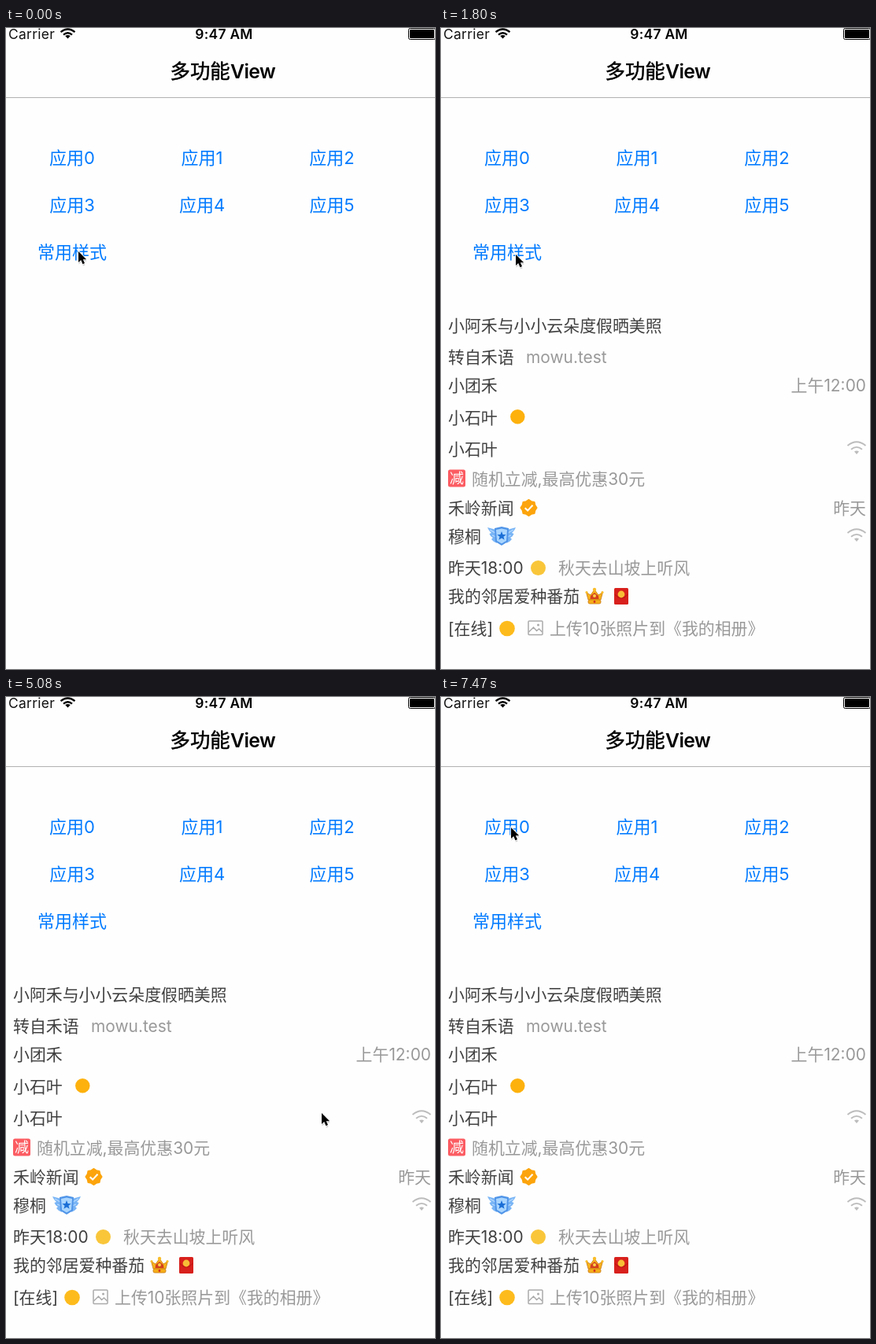
These frames come from a looping animation (545 by 815 pixels, 8 s). An HTML page:

```html
<!DOCTYPE html>
<html lang="zh-CN">
<head>
<meta charset="utf-8">
<title>多功能View</title>
<style>
html, body { margin: 0; width: 100%; height: 100%; overflow: hidden; background: #fefefe; }
svg { display: block; width: 100%; height: 100%; }
text { font-family: Inter, "Noto Sans CJK SC", "Noto Sans CJK", sans-serif; white-space: pre; }
</style>
</head>
<body>
<svg id="stage" viewBox="0 0 545 815">
  <rect width="545" height="815" fill="#fefefe"/>
  <path d="M0 88.5H545" stroke="#b2b2b2"/>
  <g id="bar"></g>
  <g id="buttons"></g>
  <g id="list"></g>
  <g id="cursor">
    <path d="M0 1V15L3.3 12L5.6 17.2L8.2 16L6 11H10.4Z" fill="#000" opacity=".18" transform="translate(.4 1.4)"/>
    <path d="M0 0V14L3.2 11L5.5 16.2L8 15L5.8 10.2H10.2Z" stroke="#fff" stroke-width="1.6" paint-order="stroke"/>
  </g>
</svg>
<script>
const LOOP = 8000;
const BLUE = '#007aff', DARK = '#404040', GREY = '#999';
const $ = id => document.getElementById(id);

// y is the visual middle of the line
const text = (x, y, str, size, fill, extra = '') =>
  `<text x="${x}" y="${y + size * 0.37}" font-size="${size}" fill="${fill}" ${extra}>${str}</text>`;
const line = (x, y, str, fill = DARK, extra = '') => text(x, y, str, 20.9, fill, extra);
const END = 'text-anchor="end"';
const MID = 'text-anchor="middle"';

const path = (d, fill, extra = '') => `<path d="${d}" fill="${fill}" ${extra}/>`;
const stroke = (d, color, width, extra = '') =>
  path(d, 'none', `stroke="${color}" stroke-width="${width}" ${extra}`);
const dot = (x, y, r, fill) => `<circle cx="${x}" cy="${y}" r="${r}" fill="${fill}"/>`;
const box = (x, y, w, h, r, fill, extra = '') =>
  `<rect x="${x}" y="${y}" width="${w}" height="${h}" rx="${r}" fill="${fill}" ${extra}/>`;

// closed shape alternating between two radii
function burst(x, y, points, outer, inner) {
  let d = '';
  for (let i = 0; i < points * 2; i++) {
    const a = Math.PI * i / points - Math.PI / 2, r = i % 2 ? inner : outer;
    d += `${i ? 'L' : 'M'}${(x + r * Math.cos(a)).toFixed(2)} ${(y + r * Math.sin(a)).toFixed(2)}`;
  }
  return d + 'Z';
}

const at = (x, y, body) => `<g transform="translate(${x} ${y})">${body}</g>`;

const signal = y => at(528, y,
  stroke('M-11.5 -4Q0 -13.5 11.5 -4M-7 .8Q0 -5 7 .8', '#bcbcbc', 1.8) +
  path('M-3 3.5Q0 1.5 3 3.5L0 7Z', '#bcbcbc'));

const check = at(111.5, 610,
  path(burst(0, 0, 8, 10.3, 8.8), '#fca40c', 'stroke="#fca40c" stroke-width="1.4" stroke-linejoin="round"') +
  stroke('M-4.8 .3L-1.4 3.6L5 -3.2', '#fff', 2.1));

const wing = path('M-7 -8L-18 -11Q-16 -6 -13 -4L-15.5 -3Q-14 1 -11 2L-13 4Q-10 8 -6 9Z', '#78b4f5') +
  stroke('M-15 -8L-8 -4M-12 -1L-7 1', '#b9dcff', 1.3);
const badge = at(77, 646,
  wing + `<g transform="scale(-1 1)">${wing}</g>` +
  path('M-9 -10L0 -12L9 -10L8 7L0 12L-8 7Z', '#4f94e8') +
  path('M-7 -8L0 -9.5L7 -8L6 6L0 9.5L-6 6Z', '#a9d5ff') +
  path(burst(0, 0, 5, 6, 2.6), '#1c6fd6'));

const crown = at(195, 722,
  path('M-8 5L-10.5 -4.5L-5 -1L0 -8L5 -1L10.5 -4.5L8 5Z', '#f8b31c', 'stroke="#c87810" stroke-width=".8"') +
  path('M-5.5 4L-5 0L0 -4L5 0L5.5 4Z', '#d3411f') +
  box(-8, 5, 16, 5, 2, '#f6ae18', 'stroke="#c87810" stroke-width=".8"') +
  dot(0, -8, 2.2, '#f9bd2a') + dot(-10, -4.5, 1.6, '#f9bd2a') + dot(10, -4.5, 1.6, '#f9bd2a') +
  dot(0, 7.5, 1.4, '#d3311f') + dot(0, 0, 2, '#fbd04a'));

const envelope = box(220, 712, 18, 21, 1.5, '#d8201c') +
  stroke('M220.5 720Q229 730 237.5 720', '#b51613', 1) + dot(229, 720, 4.4, '#f8bd36');

const picture = box(111, 754, 18, 17.5, 1, 'none', 'stroke="#aaa" stroke-width="1.5"') +
  stroke('M111.5 768L117.5 762L121.5 766.5L124.5 764L128.5 768', '#aaa', 1.4) +
  dot(123.5, 759, 1.5, '#aaa');

$('bar').innerHTML =
  text(3, 7.5, 'Carrier', 17.4, '#111', 'letter-spacing=".3"') +
  stroke('M69.5 5.2Q78.5 -2.2 87.5 5.2M73 8.6Q78.5 4 84 8.6', '#000', 2.3) +
  path('M75.2 10.1Q78.5 7.7 81.8 10.1L78.5 13.5Z', '#000') +
  text(277, 7.5, '9:47 AM', 17.4, '#000', MID + ' font-weight="600" letter-spacing=".3"') +
  box(511.5, .5, 34, 14, 2, '#fefefe', 'stroke="#000"') + box(513, 2, 31, 11, 1, '#000') +
  text(208.5, 55, '多功能', 25.4, '#000', 'stroke="#000" stroke-width=".5"') +
  text(342, 55, 'View', 24.7, '#000', END + ' font-weight="600" letter-spacing="-.6"');

$('buttons').innerHTML =
  [0, 1, 2, 3, 4, 5].map(i =>
    text(84 + 165 * (i % 3), 165 + 60 * Math.floor(i / 3), '应用' + i, 22, BLUE, MID)).join('') +
  text(84, 285, '常用样式', 22, BLUE, MID + ' id="style"');

$('list').innerHTML = [
  line(9, 378, '小阿禾与小小云朵度假晒美照'),
  line(9, 418, '转自禾语'), line(108, 418, 'mowu.test', GREY),
  line(9, 454, '小团禾'), line(540, 454, '上午12:00', GREY, END),
  line(9, 495, '小石叶'), dot(97.3, 494.3, 9.2, '#fdb10d'),
  line(9, 535, '小石叶'), signal(535),
  box(9, 561.5, 22, 22, 2.5, '#fb5c62'), text(20, 572.5, '减', 18, '#fff', MID),
  line(39, 573, '随机立减,最高优惠30元', GREY),
  line(9, 610, '禾岭新闻'), check, line(540, 610, '昨天', GREY, END),
  line(9, 646, '穆桐'), badge, signal(646),
  line(9, 686, '昨天18:00'), dot(123.5, 686.5, 9.5, '#f9c63a'),
  line(149, 686, '秋天去山坡上听风', GREY),
  line(9, 722, '我的邻居爱种番茄'), crown, envelope,
  line(9, 763, '[在线]'), dot(84, 763.5, 9.8, '#fdbb1c'),
  picture, line(138, 763, '上传10张照片到《我的相册》', GREY)
].join('');

// pointer holds each pose until the next: time, x, y
const poses = [
  [0, 92, 284], [1650, 93, 286], [1800, 95, 288], [1940, 200, 420], [2090, 286, 521],
  [2540, 286, 520], [3290, 291, 518], [3430, 322, 522], [3580, 372, 533], [3730, 396, 538],
  [4030, 398, 538], [5080, 401, 529], [5230, 338, 420], [5380, 291, 339],
  [5680, 294, 338], [5830, 281, 277], [5980, 268, 233],
  [6420, 264, 230], [6570, 238, 214], [6720, 196, 192], [6870, 150, 172],
  [7020, 115, 161], [7170, 96, 159], [7320, 89, 164], [7470, 89, 166]
];

function draw(t) {
  const [, x, y] = poses.filter(p => p[0] <= t).pop();
  $('cursor').setAttribute('transform', `translate(${x} ${y})`);
  $('style').setAttribute('opacity', t < 1350 || t >= 1650 ? 1 : t < 1500 ? 0.2 : 0.6);
  $('list').setAttribute('visibility', t < 1500 ? 'hidden' : 'visible');
}

const start = performance.now();
function tick() {
  draw((performance.now() - start) % LOOP);
  requestAnimationFrame(tick);
}
draw(0);
requestAnimationFrame(tick);
</script>
</body>
</html>
```
